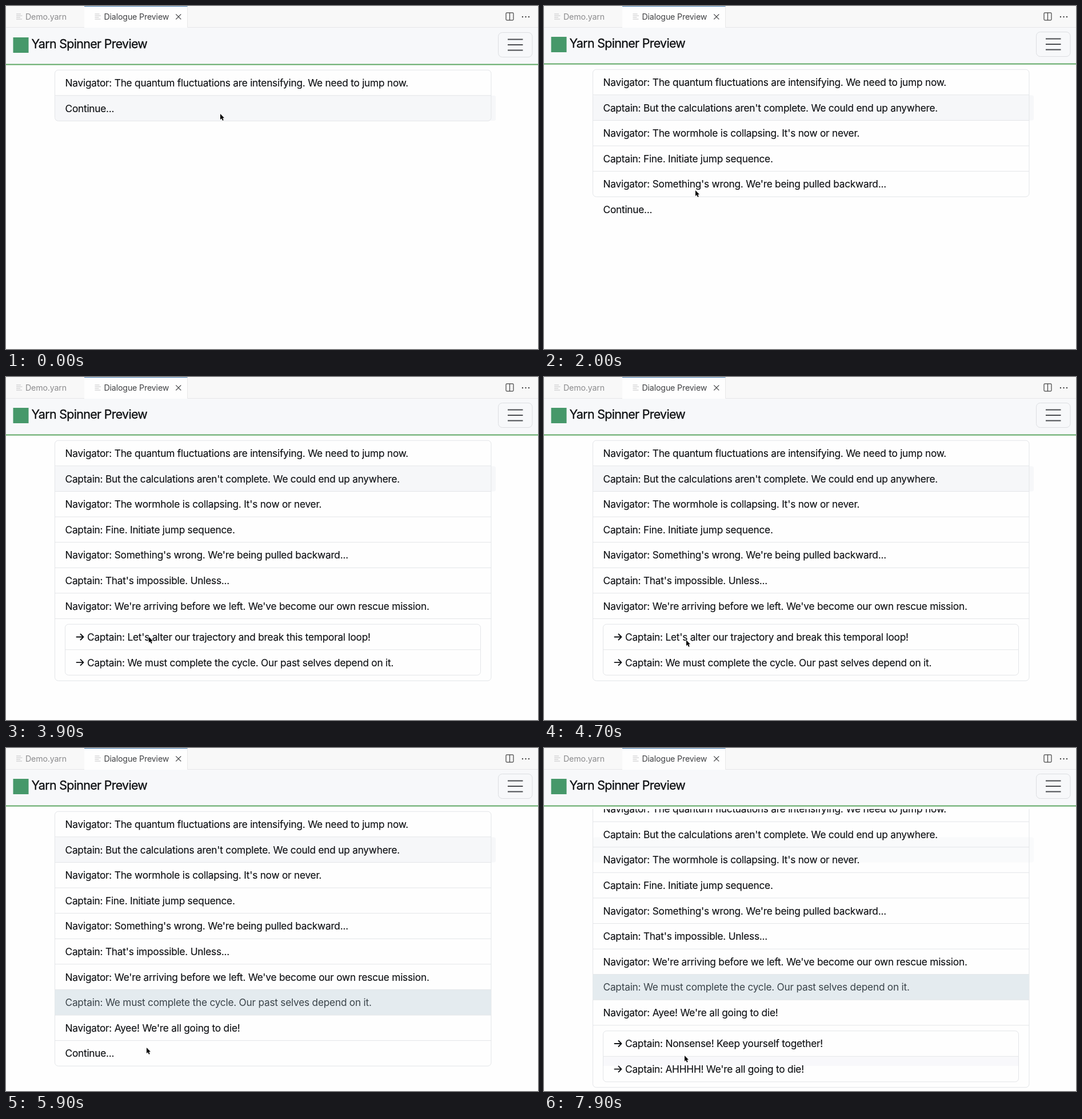
An HTML page for the animation above (8 s loop, 931 by 601 pixels).

```html
<!DOCTYPE html>
<html lang="en">
<head>
<meta charset="utf-8">
<title>Dialogue preview</title>
<style>
  html, body { margin: 0; width: 100%; height: 100%; overflow: hidden; background: #fefefe; }
  svg { display: block; width: 931px; height: 601px; }
  text { font-family: Inter, Roboto, sans-serif; white-space: pre; }
  .line { font-size: 17.3px; letter-spacing: -.24px; fill: #101215; stroke: #101215; stroke-width: .15px; }
  .title { font-size: 21.4px; letter-spacing: -.67px; fill: #0c0e10; stroke: #0c0e10; stroke-width: .3px; }
  .tab { font-size: 14.2px; letter-spacing: -.15px; }
  .picked .line { fill: #3a4349; stroke: none; }
</style>
</head>
<body>
<svg viewBox="0 0 931 601" xmlns="http://www.w3.org/2000/svg">
  <defs><clipPath id="page"><rect y="107" width="931" height="494"/></clipPath></defs>
  <g id="list" clip-path="url(#page)"></g>
  <g id="header">
    <rect y="30" width="931" height="71" fill="#f7f8fa"/>
    <path d="M0 101.500H931" stroke="#5fa865" stroke-width="1.8"/>
    <rect x="12.5" y="54" width="27" height="27" fill="#46986a"/>
    <text class="title" x="44.5" y="72.5">Yarn Spinner Preview</text>
    <rect x="861.5" y="45.5" width="59.5" height="43" rx="7" fill="none" stroke="#dcdee1"/>
    <path d="M878 57.5H904.500M878 67H904.500M878 76.500H904.500" stroke="#494b4f" stroke-width="2"/>
  </g>
  <g id="tabs" fill="none">
    <rect width="931" height="37.500" fill="#f8f8f8"/>
    <path d="M0 37.500H931" stroke="#e6e6e8"/>
    <rect x="137" width="180.500" height="38" fill="#fefefe"/>
    <path d="M137 .5H317.500" stroke="#4079b0" stroke-width="1.2"/>
    <path d="M317.500 1V37.500" stroke="#e8e8e8"/>
    <path id="file" d="M18 14H26M18 17H28.500M18 20H25M18 23H28" stroke="#c4c4c6" stroke-width="1.1"/>
    <use href="#file" x="137.500"/>
    <text class="tab" x="34" y="24" fill="#8b8b8d">Demo.yarn</text>
    <text class="tab" x="171.500" y="24" fill="#3f4043">Dialogue Preview</text>
    <path d="M297.300 14.300L306.300 23.300M306.300 14.300L297.300 23.300" stroke="#3f4043" stroke-width="1.2"/>
    <rect x="875" y="11.800" width="13" height="13" rx="1.500" stroke="#444" stroke-width="1.2"/>
    <path d="M881.500 12V25" stroke="#444" stroke-width="1.2"/>
    <g fill="#444"><circle cx="904" cy="19" r="1.200"/><circle cx="909.500" cy="19" r="1.200"/><circle cx="915" cy="19" r="1.200"/></g>
  </g>
  <g id="overlay"></g>
</svg>
<script>
const LOOP = 8000, STEP = 100, TOP = 111.2, ROW = 44.6, PAD = 9.8;
const LEFT = 85.5, WIDTH = 763.5;
const BORDER = '#e3e5e8';

const lines = [
  'Navigator: The quantum fluctuations are intensifying. We need to jump now.',
  "Captain: But the calculations aren't complete. We could end up anywhere.",
  "Navigator: The wormhole is collapsing. It's now or never.",
  'Captain: Fine. Initiate jump sequence.',
  "Navigator: Something's wrong. We're being pulled backward...",
  "Captain: That's impossible. Unless...",
  "Navigator: We're arriving before we left. We've become our own rescue mission.",
  'Captain: We must complete the cycle. Our past selves depend on it.',
  "Navigator: Ayee! We're all going to die!"
];
const firstChoice = ["Captain: Let's alter our trajectory and break this temporal loop!", lines[7]];
const lastChoice = ['Captain: Nonsense! Keep yourself together!', "Captain: AHHHH! We're all going to die!"];

// Moments at which a click takes effect
const clicks = [400, 900, 1400, 1900, 2400, 2900, 3400, 5600, 6400];
const ASK = 3400, PICK = 5600, SCROLL = 6400;

// Pointer path: time, x, y
const path = [
  [0, 375, 189], [100, 370, 193], [300, 370, 193], [800, 325, 230], [1300, 292, 273],
  [1800, 268, 316], [2000, 265, 323], [2300, 257, 361], [2800, 253, 405], [3300, 252, 441],
  [3800, 250, 455], [4700, 249, 461], [5000, 249, 462], [5300, 247, 499], [5500, 247, 499],
  [5700, 246, 525], [5900, 246, 525], [6300, 245, 549], [7300, 245, 549], [7600, 246, 582],
  [7900, 246, 539], [8000, 246, 539]
];

const $ = id => document.getElementById(id);
const rect = (x, y, w, h, fill, more = '') =>
  `<rect x="${x}" y="${y}" width="${w}" height="${h}" fill="${fill}" ${more}/>`;
const frame = (x, y, w, h) => rect(x, y, w, h, 'none', `rx="6" stroke="${BORDER}"`);
const rule = (x, y, w) => `<path d="M${x} ${y}h${w}" stroke="${BORDER}"/>`;
const label = (x, y, s) => `<text class="line" x="${x}" y="${y + 28.7}">${s}</text>`;

function pointer(t) {
  const i = path.findIndex(p => p[0] > t);
  const [t0, x0, y0] = path[i - 1], [t1, x1, y1] = path[i];
  const k = (t - t0) / (t1 - t0), e = k * k * (3 - 2 * k);
  return [x0 + (x1 - x0) * e, y0 + (y1 - y0) * e];
}

function choices(y, items, scrolled, plain) {
  const x = 103.5, w = 727;
  let out = '';
  if (scrolled) out += rect(x, y + ROW + 1, w, 16, plain ? '#e9eaee' : '#f8f8fb');
  if (!plain) out += frame(x, y, w, 2 * ROW);
  out += rule(x, y + ROW, w);
  items.forEach((s, i) => {
    const top = y + i * ROW;
    out += `<path d="M123.500 ${top + 22.3}h12m-5-5l5 5l-5 5" fill="none" stroke="#101215"
      stroke-width="1.9" stroke-linecap="round" stroke-linejoin="round"/>` + label(142, top, s);
  });
  return out;
}

function list(t, pressed) {
  const scrolled = t >= SCROLL, picked = t >= PICK;
  const asking = scrolled || (t >= ASK && !picked);
  const count = picked ? 9 : Math.min(7, 1 + clicks.filter(c => c <= t).length);
  const y = TOP + (t < 300 ? 1 : 0) - (scrolled ? 26.7 : 0);
  const at = i => y + i * ROW;
  // Borders trail the text just after a change
  const fresh = t < ASK && clicks.some(c => t >= c && t < c + 200);
  const plain = scrolled && t < SCROLL + 200;
  const tail = asking ? 2 * ROW + 2 * PAD : fresh ? 0 : ROW;

  let out = rect(86, t < 300 ? 157 : 156.5, 771, 44, scrolled ? '#f9fafb' : '#f6f7f9', 'rx="3"');
  if (pressed && !asking) out += rect(LEFT, at(count), WIDTH, ROW, '#e9e9ee', 'rx="5"');
  out += plain
    ? frame(LEFT, TOP, WIDTH, 10 * ROW)
    : frame(LEFT, y, WIDTH, count * ROW + tail);
  if (picked) out += rect(LEFT, at(7), WIDTH, ROW, '#e4ebef');
  for (let i = 0; i < count; i++) {
    if (i && !plain) out += rule(LEFT, at(i), WIDTH);
    const text = label(103.5, at(i), lines[i]);
    out += picked && i === 7 ? `<g class="picked">${text}</g>` : text;
  }
  if (!fresh && !plain) out += rule(LEFT, at(count), WIDTH);
  return out + (asking
    ? choices(at(count) + PAD, picked ? lastChoice : firstChoice, scrolled, plain)
    : label(103.5, at(count), 'Continue...'));
}

function overlay(t, pressed) {
  const [x, y] = pointer(t);
  let out = '';
  if (t >= SCROLL && t < 7100)
    out += rect(905.5, 137, 6, 456, '#b4b4b6', `rx="3" opacity="${t < 7000 ? 1 : 0.4}"`);
  if (pressed)
    out += `<circle cx="${x}" cy="${y}" r="16.500" fill="#fff" fill-opacity=".3" stroke="#1c1c1e" stroke-width="1.300"/>`;
  return out + `<path transform="translate(${x} ${y})" d="M0 0V10L2.300 8L4 11.800L5.700 11L4.100 7.300H7Z"
    fill="#000" stroke="#fff" stroke-width="1" paint-order="stroke"/>`;
}

let shown = -1;
function draw(now) {
  const t = Math.floor(now % LOOP / STEP) * STEP;
  if (t === shown) return;
  shown = t;
  const pressed = clicks.some(c => t >= c - 100 && t < c);
  $('header').setAttribute('transform', `translate(0 ${t < 300 ? 1 : 0})`);
  $('list').innerHTML = list(t, pressed);
  $('overlay').innerHTML = overlay(t, pressed);
}

const start = performance.now();
function tick() {
  draw(performance.now() - start);
  requestAnimationFrame(tick);
}
tick();
</script>
</body>
</html>
```
